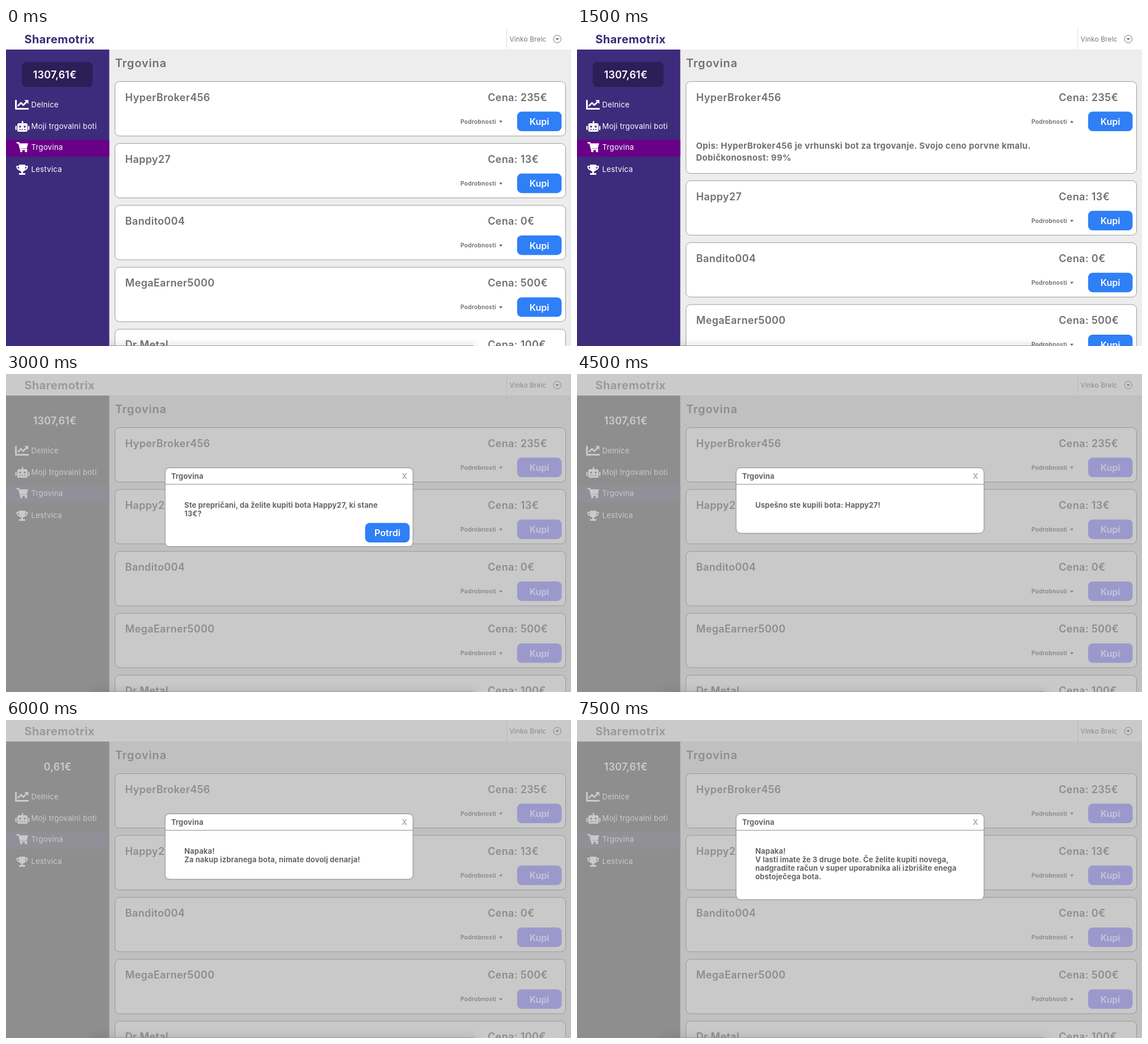
Animation, 998 px wide and 561 px high, one loop 8000 ms. Source, as an HTML page:

```html
<!DOCTYPE html>
<html lang="sl">
<head>
<meta charset="utf-8">
<title>Trgovina</title>
<style>
  html, body { margin: 0; width: 100%; height: 100%; overflow: hidden; background: #ededed; }
  svg { display: block; width: 998px; height: 561px; }
  text { font-family: Inter, "Open Sans", sans-serif; white-space: pre; }
</style>
</head>
<body>
<svg id="stage" viewBox="0 0 998 561"></svg>
<script>
const stage = document.getElementById('stage');

const BRIGHT = {
  page: '#ededed', header: '#fff', rule: '#dedede', brand: '#3b2a7a', user: '#757575',
  side: '#3d2b7c', balanceBox: '#2b1f57', active: '#690088', menu: '#fff',
  card: '#fff', border: '#9c9c9c', ink: '#707070', small: '#666', button: '#2f7ff7', buttonInk: '#fff'
};
const DIMMED = {
  page: '#c0c0c0', header: '#cacaca', rule: '#b8b8b8', brand: '#9b9b9b', user: '#888',
  side: '#8e8e8e', balanceBox: 'none', active: '#918f97', menu: '#cacaca',
  card: '#c9c9c9', border: '#989898', ink: '#8d8d8d', small: '#858585', button: '#9b99cb', buttonInk: '#c6c5da'
};

const BOTS = [
  ['HyperBroker456', 235], ['Happy27', 13], ['Bandito004', 0],
  ['MegaEarner5000', 500], ['Dr Metal', 100]
];

const SCENES = [
  { duration: 1500 },
  { duration: 1500, open: true },
  { duration: 1500, modal: {
    bottom: 304.5, confirm: true,
    lines: ['Ste prepričani, da želite kupiti bota Happy27, ki stane', '13€?'] } },
  { duration: 1500, modal: { bottom: 281, lines: ['Uspešno ste kupili bota: Happy27!'] } },
  { duration: 1500, balance: '0,61€', modal: {
    bottom: 281, lines: ['Napaka!', 'Za nakup izbranega bota, nimate dovolj denarja!'] } },
  { duration: 500, modal: { bottom: 317, lines: [
    'Napaka!', 'V lasti imate že 3 druge bote. Če želite kupiti novega,',
    'nadgradite račun v super uporabnika ali izbrišite enega', 'obstoječega bota.'] } }
];
const LOOP = SCENES.reduce((sum, scene) => sum + scene.duration, 0);

const rect = (x, y, w, h, fill, r = 0, stroke = 'none') =>
  `<rect x="${x}" y="${y}" width="${w}" height="${h}" rx="${r}" fill="${fill}" stroke="${stroke}"/>`;

const text = (x, y, size, fill, content, { weight = 600, spacing = 0.02, anchor = 'start' } = {}) =>
  `<text x="${x}" y="${y}" font-size="${size}" fill="${fill}" font-weight="${weight}"
    letter-spacing="${spacing * size}" text-anchor="${anchor}">${content}</text>`;

const path = (d, fill) => `<path d="${d}" fill="${fill}"/>`;
const line = (d, stroke, width = 1) =>
  `<path d="${d}" fill="none" stroke="${stroke}" stroke-width="${width}" stroke-linecap="round" stroke-linejoin="round"/>`;

const button = (x, y, label, c) =>
  rect(x, y, 78.6, 34.4, c.button, 8) +
  text(x + 39.4, y + 23.5, 16, c.buttonInk, label, { anchor: 'middle', spacing: 0 });

function icons(c) {
  const ink = c.menu;
  const chart = line('M17.5 128V142.5H39', ink, 3) + line('M21.5 137L26.5 132L30.5 136L37 129.5', ink, 2.8) +
    path('M32.5 127H39.5V134Z', ink);
  const robot = rect(20, 168, 18, 15, ink, 2.5) + rect(27.8, 164, 2.6, 5, ink, 1) +
    rect(16.5, 172.5, 2.4, 7.5, ink, 1) + rect(39, 172.5, 2.4, 7.5, ink, 1) +
    `<g fill="${c.side}"><circle cx="25" cy="174" r="1.8"/><circle cx="33" cy="174" r="1.8"/></g>` +
    [23.5, 27.8, 32.1].map(x => rect(x, 178.5, 2.4, 1.5, c.side)).join('');
  const cart = line('M19.5 202.5H22.7L25.7 214H36.5', ink, 2.4) + path('M23.5 203.5H39L36.8 212.2H26Z', ink) +
    `<g fill="${ink}"><circle cx="27" cy="217" r="2.2"/><circle cx="35.3" cy="217" r="2.2"/></g>`;
  const trophy = path('M23 241H34V247Q34 252 30 253.5V256H34V259H23V256H27V253.5Q23 252 23 247Z', ink) +
    line('M23 244H19.3Q19.5 249.5 25 250.5M34 244H37.7Q37.5 249.5 32 250.5', ink, 2.2);
  return chart + robot + cart + trophy;
}

function sidebar(balance, c) {
  const labels = [['Delnice', 140], ['Moji trgovalni boti', 178.3], ['Trgovina', 215.3], ['Lestvica', 254]];
  return rect(0, 38, 182.4, 523, c.side) + rect(28, 60, 125, 44, c.balanceBox, 8) +
    text(balance ? 66.8 : 47.8, 89, 18, c.menu, balance || '1307,61€', { spacing: 0.01 }) +
    rect(0, 197, 182.4, 30, c.active) + icons(c) +
    labels.map(([label, y]) => text(44.5, y, 13.2, c.menu, label, { weight: 400 })).join('');
}

function header(c) {
  return rect(0, 0, 998, 38, c.header) + rect(884, 0, 1, 38, c.rule) +
    text(32.5, 27, 20, c.brand, 'Sharemotrix', { weight: 700 }) +
    text(889.5, 23.7, 11.7, c.user, 'Vinko Brelc', { weight: 400 }) +
    `<circle cx="973.7" cy="19.5" r="6.7" fill="none" stroke="${c.user}"/>` +
    path('M970.4 18H977L973.7 21.8Z', c.user);
}

function card([name, price], y, open, c) {
  const caret = open ? `M871 ${y + 72.5}h6l-3 -3.8Z` : `M871 ${y + 69}h6l-3 3.8Z`;
  const details = open
    ? text(210.2, y + 118.7, 15, c.ink, `Opis: ${name} je vrhunski bot za trgovanje. Svojo ceno porvne kmalu.`, { weight: 700 }) +
      text(210.2, y + 139, 15, c.ink, 'Dobičkonosnost: 99%', { weight: 700 })
    : '';
  return rect(192.5, y, 796, open ? 162 : 96, c.card, 8, c.border) +
    text(210.5, y + 34, 18, c.ink, name) +
    text(851, y + 34, 18, c.ink, `Cena: ${price}€`) +
    text(802.7, y + 74.2, 10.2, c.small, 'Podrobnosti', { spacing: 0.03 }) +
    path(caret, c.small) + button(902.8, y + 53.1, 'Kupi', c) + details;
}

function dialog({ bottom, lines, confirm }) {
  const bold = { weight: 700, spacing: 0.01 };
  return rect(281, 165.5, 438, bottom - 165.5, '#fff', 8, '#838383') +
    rect(281, 194, 438, 1, '#8f8f8f') +
    text(291.7, 185, 13, '#666', 'Trgovina', bold) +
    text(699, 185.3, 13.5, '#aaa', 'X') +
    lines.map((content, i) => text(315, 235.7 + i * 15.25, 13, '#666', content, bold)).join('') +
    (confirm ? button(634.3, 262.8, 'Potrdi', BRIGHT) : '');
}

// Soft shadow rising from the bottom edge of the window.
const bottomShadow = `
  <defs><filter id="blur" x="-10%" y="-400%" width="120%" height="900%"><feGaussianBlur stdDeviation="8"/></filter></defs>
  <rect x="150" y="559" width="680" height="14" fill="#334" opacity=".17" filter="url(#blur)"/>
  <rect x="184" y="560" width="642" height="1" fill="#999"/>`;

function render({ balance, open, modal }) {
  const c = modal ? DIMMED : BRIGHT;
  const cards = BOTS.map((bot, i) =>
    card(bot, 94.5 + i * 109.2 + (open && i ? 65.8 : 0), open && i === 0, c)).join('');
  stage.innerHTML = rect(0, 0, 998, 561, c.page) + header(c) + sidebar(balance, c) +
    text(192.7, 69, 20, c.ink, 'Trgovina', { spacing: 0.04 }) + cards + bottomShadow +
    (modal ? dialog(modal) : '');
}

function sceneAt(time) {
  let end = 0;
  return SCENES.find(scene => time < (end += scene.duration));
}

let shown;
const start = performance.now();
function tick() {
  const scene = sceneAt((performance.now() - start) % LOOP);
  if (scene !== shown) render(shown = scene);
  requestAnimationFrame(tick);
}
tick();
</script>
</body>
</html>
```
